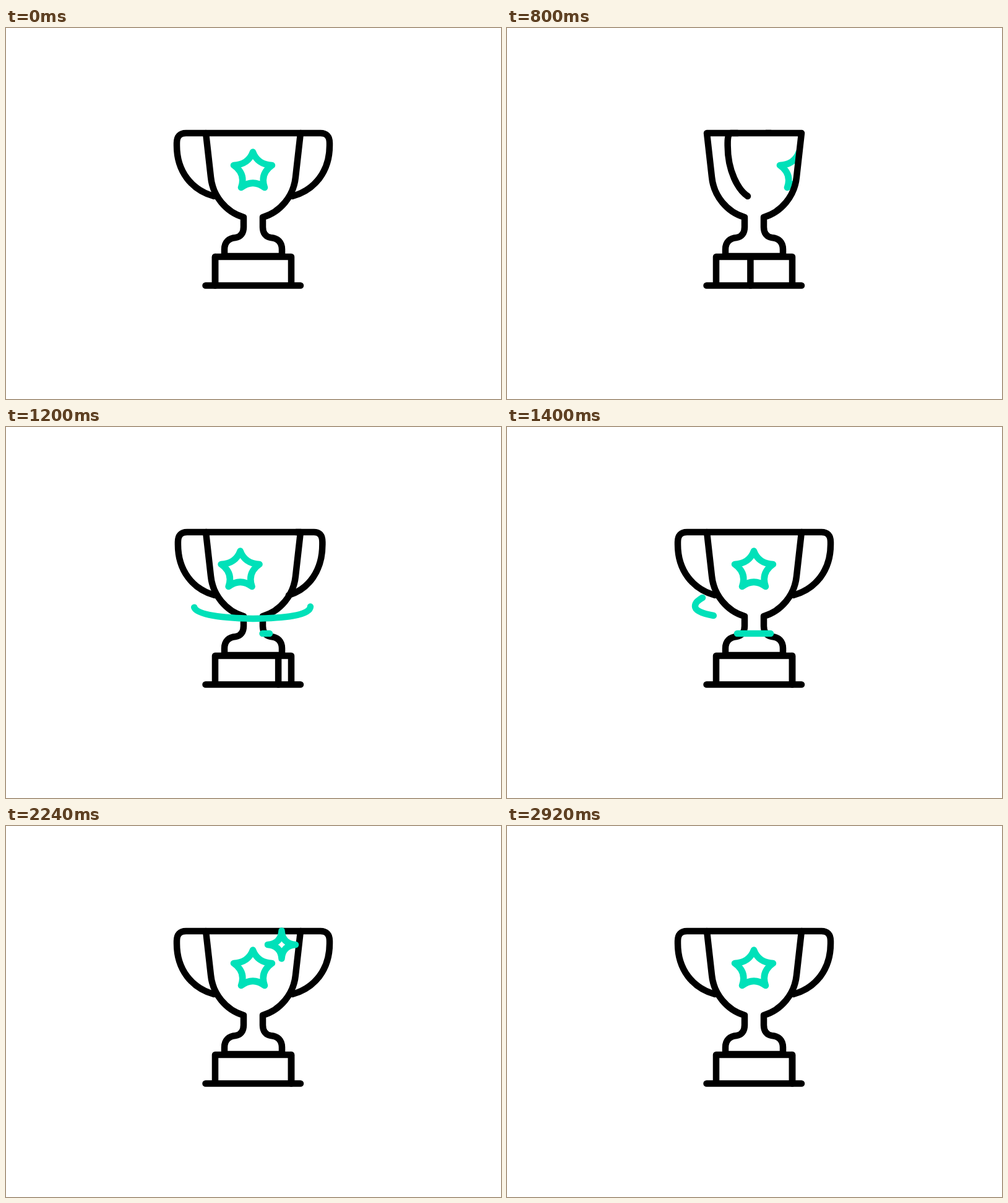
An HTML page that plays this animation: 800 by 600 pixels, repeating every 2.96 s.

```html
<!DOCTYPE html>
<html lang="en">
<head>
<meta charset="utf-8">
<title>Trophy</title>
<style>
  html, body { margin: 0; width: 100%; height: 100%; overflow: hidden; background: #fff; }
  svg { display: block; width: 100%; height: 100%; }
  .line { fill: none; stroke: #000; stroke-width: 10.5; stroke-linecap: round; stroke-linejoin: round; }
  .teal { stroke: #00e1b9; }
</style>
</head>
<body>
<svg viewBox="0 0 800 600">
  <defs>
    <path id="bowl" d="M323 170 L331 241 C334 272 356 298 384 306 L384 322 C384 332 379 338 371 339 C360 340 353 346 353 358 V369
      H446 V358 C446 346 439 340 428 339 C420 338 415 332 415 322 V306 C443 298 465 272 468 241 L476 170 Z"/>
    <clipPath id="inside"><use href="#bowl"/></clipPath>
    <path id="star" d="M399 200.5 Q406.5 221 430 222 Q410 235.5 418 258 Q399 243.5 380 258 Q388 235.5 368 222 Q391.5 221 399 200.5 Z"/>
  </defs>

  <path id="back" class="line"/>
  <use href="#bowl" fill="#fff"/>
  <g clip-path="url(#inside)" class="line teal">
    <use id="starOut" href="#star"/>
    <use id="starIn" href="#star"/>
  </g>
  <use href="#bowl" class="line"/>
  <path class="line" d="M338 416.5 V370 H461 V416.5 M322.5 416.5 H476"/>
  <path id="edge" class="line" d="M0 370 V416.5"/>
  <path id="front" class="line"/>

  <path id="ribbon" class="line teal" pathLength="1"
    d="M486 274 C489 278 492 283 492 290 C492 305 450 309 399 310 C350 309 304 304 304 290 C304 284 308 281 316 276"/>
  <path id="ring" class="line teal" pathLength="1" d="M426 334 H372"/>
  <path id="sparkle" class="line teal"
    d="M0 -22.5 Q1.4 -1.4 22.5 0 Q1.4 1.4 0 22.5 Q-1.4 1.4 -22.5 0 Q-1.4 -1.4 0 -22.5 Z"/>
</svg>
<script>
  const LOOP = 2960, STEP = 40, MID = 399.5;
  const el = id => document.getElementById(id);
  const span = (t, a, b) => Math.min(1, Math.max(0, (t - a) / (b - a)));
  const smooth = u => u * u * (3 - 2 * u);
  const smoother = u => u * u * u * (10 + u * (6 * u - 15));
  const move = (id, x) => el(id).setAttribute('transform', `translate(${x} 0)`);

  // Handle seen at a turn of 0..1 (half a revolution); its lower end may lead.
  function handle(turn, lead, side) {
    const x = (r, extra = 0) => MID + side * r * Math.cos(Math.PI * (turn + extra));
    return `M${x(76.5)} 170 L${x(108.5)} 170 Q${x(123.5)} 170 ${x(123.5)} 186 V190 ` +
      `C${x(123.5)} 232 ${x(99.5, lead / 2)} 262 ${x(63.5, lead)} 272`;
  }

  function trim(id, from, to) {
    const path = el(id), len = to - from;
    path.style.display = len > 0.002 ? '' : 'none';
    path.style.strokeDasharray = `${len} 2`;
    path.style.strokeDashoffset = -from;
  }

  function draw(t) {
    const u = span(t, 420, 1362);
    const turn = 0.65 * u + 0.35 * smooth(u);
    const lead = 0.105 * Math.max(0, Math.sin(2 * Math.PI * u));
    el('front').setAttribute('d', handle(turn, lead, -1));
    el('back').setAttribute('d', handle(turn + 0.85 * u ** 3 * (1 - u), 0, 1));
    move('edge', 338 + 123 * (u + 0.55 * u * (1 - u) ** 3));

    const slide = 267 * smoother(span(t, 430, 1420));
    move('starOut', slide);
    move('starIn', slide - 267);

    trim('ribbon', smooth(span(t, 1135, 1520)), smooth(span(t, 800, 1290)));
    trim('ring', smooth(span(t, 1400, 1540)), smooth(span(t, 1120, 1390)));

    const size = smooth(span(t, 1530, 1880)) - smooth(span(t, 2580, 2920));
    el('sparkle').style.display = size > 0.001 ? '' : 'none';
    el('sparkle').setAttribute('transform', `translate(445.5 192) scale(${size})`);
  }

  const start = performance.now();
  function tick() {
    const t = (performance.now() - start) % LOOP;
    draw(Math.floor(t / STEP) * STEP);
    requestAnimationFrame(tick);
  }
  draw(0);
  requestAnimationFrame(tick);
</script>
</body>
</html>
```
